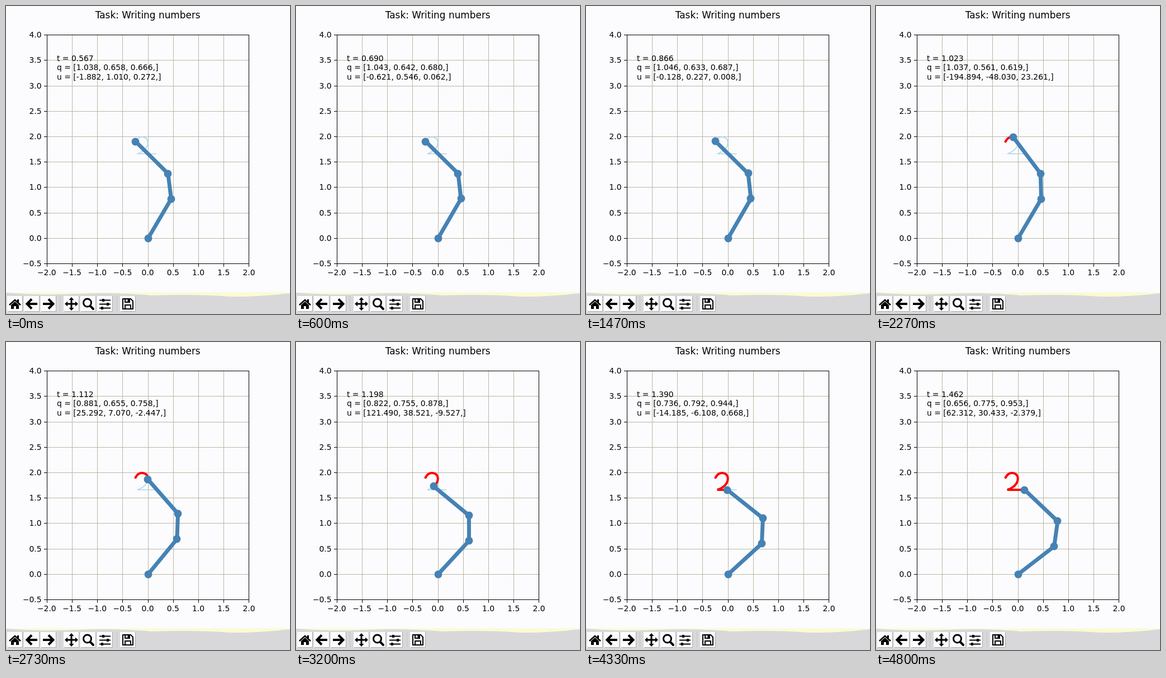
Recreate the animation shown at these times as an HTML page. Size 508 px wide and 548 px high, loop 4.87 s.

```html
<!DOCTYPE html>
<html lang="en">
<head>
<meta charset="utf-8">
<title>Writing numbers</title>
<style>
  html, body { margin: 0; width: 100%; height: 100%; overflow: hidden; background: #fcfcfe; }
  svg { display: block; }
  text { font: 13.89px "DejaVu Sans", sans-serif; white-space: pre; }
  .title { font-size: 16.9px; }
  .line { fill: none; stroke: #000; }
</style>
</head>
<body>
<svg width="508" height="548" viewBox="0 0 508 548">
  <defs>
    <path id="arrow" d="M10 0H-7M0-8.5L-8.5 0L0 8.5" class="line" stroke-width="4"/>
    <path id="two" d="M231.8 241C234.5 235.5 238.5 232.9 243 232.9C249.5 232.9 253.8 237 253.8 242.8C253.8 248.5 251 253 247 256.4C243.5 259.4 239.5 261.7 234.8 263H269.5"/>
  </defs>

  <text class="title" x="253.7" y="22" text-anchor="middle">Task: Writing numbers</text>
  <g id="axes"></g>
  <rect x="73.5" y="51.5" width="361" height="407" class="line"/>
  <use href="#two" fill="none" stroke="lightblue" stroke-width="1.7"/>
  <use href="#two" id="trail" fill="none" stroke="#f00" stroke-width="4" stroke-linecap="square"/>
  <g id="arm" fill="steelblue">
    <polyline fill="none" stroke="steelblue" stroke-width="7" stroke-linejoin="round"/>
    <circle r="6.9"/><circle r="6.9"/><circle r="6.9"/><circle r="6.9"/>
  </g>
  <g id="info">
    <text x="91" y="98"/><text x="91" y="114"/><text x="91" y="130.5"/>
  </g>

  <path d="M0 509.5H508V520H0Z" fill="#fbfbd4"/>
  <path d="M0 510Q60 515 130 512T260 515Q340 512 400 517Q450 518 508 511V548H0Z" fill="#d8d8db"/>
  <path d="M96.5 516V544M198.5 516V544" stroke="#b4b4a8" stroke-dasharray="1"/>
  <g id="buttons">
    <g>
      <path d="M-10 2L0-7L10 2" class="line" stroke-width="2.6"/>
      <path d="M-7 2L0-4L7 2V9H2V4H-2V9H-7ZM4-8H7V-1L4-4Z"/>
    </g>
    <use href="#arrow"/>
    <use href="#arrow" transform="scale(-1 1)"/>
    <g>
      <path d="M-9 0H9M0-9V9" class="line" stroke-width="3"/>
      <path d="M0-12L4.5-7H-4.5ZM0 12L4.5 7H-4.5ZM-12 0L-7-4.5V4.5ZM12 0L7-4.5V4.5Z"/>
    </g>
    <g class="line">
      <circle cx="-1.5" cy="-2" r="7" stroke-width="3"/>
      <path d="M4 4L9 9" stroke-width="4" stroke-linecap="round"/>
    </g>
    <g class="line">
      <path d="M-10-6.5H10M-10 .5H10M-10 7.5H10" stroke-width="2"/>
      <path d="M-3-9V-4M5-2V3M-5 5V10" stroke-width="4"/>
    </g>
    <g class="line" stroke-width="2">
      <path d="M-9-9H5L9-5V9H-9Z"/>
      <path d="M-5 9V2H5V9M-5-9V-3H3V-9"/>
      <path d="M1-9V-4" stroke-width="3"/>
    </g>
  </g>
</svg>
<script>
const FRAMES = 73, STEP = 200 / 3, LOOP = 4870;
const START = 26, LAST = FRAMES - 1;
const LINKS = [0.9, 0.5, 0.9];
const X0 = 254.15, Y0 = 413.3, SCALE = 90.42;
const $ = s => document.querySelector(s);
const px = x => X0 + x * SCALE;
const py = y => Y0 - y * SCALE;
const two = $("#two");
const penLength = two.getTotalLength() - 3.7;

const clock = f => 0.567 + 0.0137 * f - 2.45e-7 * f ** 3;

// Length written so far, a little faster around the curve
function written(f) {
  const k = Math.max(0, (f - START) / (LAST - START));
  return penLength * (k + 0.04 * Math.sin(Math.PI * k) ** 2);
}

// Base, joints and tip of the arm
function chain(q) {
  let x = 0, y = 0, angle = 0;
  return [[0, 0], ...q.map((turn, i) => {
    angle += turn;
    return [x += LINKS[i] * Math.cos(angle), y += LINKS[i] * Math.sin(angle)];
  })];
}

// Before writing, the joints settle exponentially
function settle(f) {
  const e = Math.exp(-7 * (clock(f) - clock(0)));
  return [1.047 - 0.009 * e, 0.6295 + 0.0285 * e, 0.6905 - 0.0245 * e];
}

// Least joint movement that brings the tip to (x, y): pseudo-inverse steps
function follow(q, x, y) {
  for (let n = 0; n < 4; n++) {
    const points = chain(q), tip = points[3];
    const ex = x - tip[0], ey = y - tip[1];
    const jac = points.slice(0, 3).map(p => [p[1] - tip[1], tip[0] - p[0]]);
    const sum = (a, b) => jac.reduce((s, j) => s + j[a] * j[b], 0);
    const xx = sum(0, 0), xy = sum(0, 1), yy = sum(1, 1), det = xx * yy - xy * xy;
    const lx = (ex * yy - ey * xy) / det, ly = (ey * xx - ex * xy) / det;
    q = q.map((v, i) => v + jac[i][0] * lx + jac[i][1] * ly);
  }
  return q;
}

function solvePoses() {
  const poses = [];
  for (let f = 0; f < FRAMES; f++) {
    const pen = two.getPointAtLength(written(f));
    poses.push(f <= START ? settle(f)
      : follow(poses[f - 1], (pen.x - X0) / SCALE, (Y0 - pen.y) / SCALE));
  }
  return poses;
}

// Torques fade while settling, then swing with a falling amplitude
function torques(f) {
  const decay = (a, rate) => a * Math.exp(-rate * (clock(f) - clock(0)));
  if (f <= START) return [decay(-1.882, 9), decay(1.01, 5), decay(0.272, 12)];
  const n = f - 34;
  const swing = (a, rate) => a * Math.cos(Math.PI * n / 12.7) * Math.exp(-rate * n);
  return [swing(-194.894, 0.03), swing(-48.03, 0.012), swing(23.261, 0.06)];
}

function buildAxes() {
  const label = v => v.toFixed(1).replace("-", "\u2212");
  let grid = "", ticks = "", labels = "";
  for (let v = -2; v <= 4; v += .5) {
    if (v <= 2) {
      const x = Math.floor(px(v)) + .5;
      grid += `M${x} 51V458`;
      ticks += `M${x} 459v5`;
      labels += `<text x="${px(v) - .5}" y="479" text-anchor="middle">${label(v)}</text>`;
    }
    if (v >= -.5) {
      const y = Math.floor(py(v)) + .5;
      grid += `M73 ${y}H434`;
      ticks += `M73 ${y}h-5`;
      labels += `<text x="63.6" y="${y + 4.5}" text-anchor="end">${label(v)}</text>`;
    }
  }
  $("#axes").innerHTML = `<path d="${grid}" stroke="#b8b8a6"/><path d="${ticks}" stroke="#000"/>${labels}`;
}

function buildButtons() {
  [16, 46, 76, 117, 147, 177, 218].forEach((x, i) => {
    const icon = $("#buttons").children[i];
    const button = document.createElementNS("http://www.w3.org/2000/svg", "g");
    button.setAttribute("transform", `translate(${x} 530)`);
    button.innerHTML = '<path d="M-14-14H14V14H-14Z" fill="#fcfcfe"/><path d="M-13 13.5H13.5V-14" fill="none" stroke="#a8a8b0"/>';
    icon.replaceWith(button);
    button.append(icon);
  });
}

function draw(f) {
  const q = poses[f];
  const points = chain(q).map(([x, y]) => [px(x), py(y)]);
  const [bones, ...dots] = $("#arm").children;
  bones.setAttribute("points", points.join(" "));
  dots.forEach((dot, i) => {
    dot.setAttribute("cx", Math.floor(points[i][0]) + .5);
    dot.setAttribute("cy", Math.floor(points[i][1]) + .5);
  });
  $("#trail").setAttribute("stroke-dasharray", `${written(f)} 999`);
  const list = values => `[${values.map(v => v.toFixed(3)).join(", ")},]`;
  [`t = ${clock(f).toFixed(3)}`, `q = ${list(q)}`, `u = ${list(torques(f))}`]
    .forEach((line, i) => $("#info").children[i].textContent = line);
}

let shown = -1;
function tick() {
  const ms = performance.now() % LOOP;
  const f = Math.min(LAST, Math.floor((Math.floor(ms / 10) * 10 + 5) / STEP));
  if (f !== shown) draw(shown = f);
  requestAnimationFrame(tick);
}

const poses = solvePoses();
buildAxes();
buildButtons();
tick();
</script>
</body>
</html>
```
